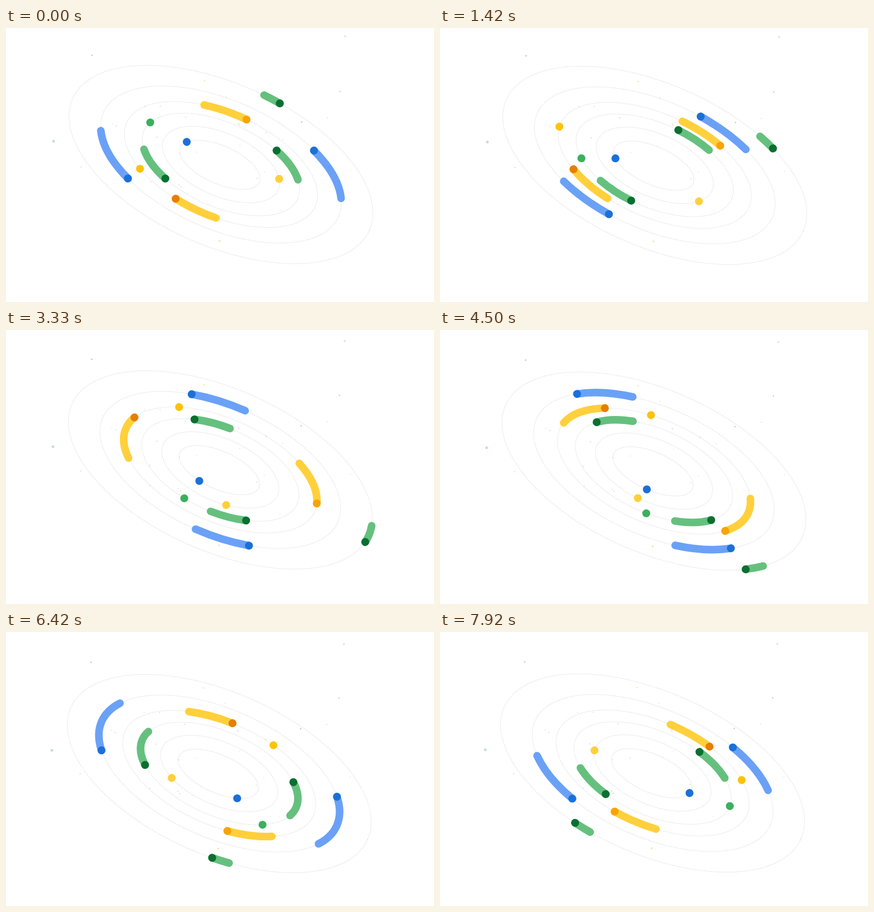
Animation, 800 px wide and 513 px high, one loop 8000 ms. Source, as an HTML page:

```html
<!DOCTYPE html>
<html lang="en">
<head>
<meta charset="utf-8">
<title>Orbits</title>
<style>
  html, body { margin: 0; width: 100%; height: 100%; overflow: hidden; background: #fff; }
  svg { display: block; width: 100vw; height: 100vh; }
  path { fill: none; }
  .orbit { stroke: #bdbdbd; stroke-width: 1; stroke-dasharray: 1 2.2; }
</style>
</head>
<body>
<svg id="stage" viewBox="0 0 800 513"></svg>
<script>
const LOOP = 8000, FPS = 12;      // ms, steps per second
const TURN = 15, DELAY = 0.02;    // seconds per revolution, seconds before the bodies start
const BAND = 0.09;                // band length as a share of its orbit
const BLUE = '#6aa1f7', GREEN = '#65c07e', YELLOW = '#ffd03b';
const DEEP_BLUE = '#1b70d8', DEEP_GREEN = '#0b6f31';

const stage = document.getElementById('stage');
const drifting = [], bodies = [];

function add(parent, tag, attributes) {
  const node = document.createElementNS('http://www.w3.org/2000/svg', tag);
  for (const [name, value] of Object.entries(attributes)) node.setAttribute(name, value);
  return parent.appendChild(node);
}

// Bigger specks are nearer and drift further
function speck(cx, cy, r, fill) {
  drifting.push({ node: add(stage, 'circle', { cx, cy, r, fill }), depth: r * 0.4 });
}

function random(seed) {
  const value = Math.sin(seed * 12.9898) * 43758.5453;
  return value - Math.floor(value);
}

for (let i = 1; i <= 24; i++) {
  const angle = random(i) * 2 * Math.PI, reach = Math.sqrt(random(i + 50));
  speck(400 + 290 * reach * Math.cos(angle), 220 + 150 * reach * Math.sin(angle),
        1 + random(i + 100) * 0.5, '#e4e9e6');
}
speck(89, 212, 2.5, '#bfe0d0');
speck(634, 15.5, 2, '#dfe5e1');
speck(399, 398.5, 1.9, '#f4e8b4');
speck(371, 99, 1.5, '#f5e9b8');
speck(161, 51, 1.5, '#c4d0ce');
speck(552.5, 176, 1.4, '#c4d0ce');
speck(624, 119, 1.3, '#c4d0ce');

const system = add(stage, 'g', {});
drifting.push({ node: system, depth: 1 });

function orbit(a, b = a / 2, x = 401.8, y = 255.6) {
  const group = add(system, 'g', { transform: `translate(${x} ${y}) rotate(24)` });
  const d = `M${a} 0A${a} ${b} 0 0 1 ${-a} 0A${a} ${b} 0 0 1 ${a} 0`;
  add(group, 'path', { d, class: 'orbit' });
  return { group, d };
}

const orbits = [orbit(303.5), orbit(240.4), orbit(192.9), orbit(157.1), orbit(117), orbit(80.6, 35.5, 400, 256.1)];
const directionOf = index => index % 2 ? -1 : 1;   // neighbours turn opposite ways

// A dash on the orbit keeps its length along the curve; start is a share of a turn
function dash(index, start, length, stroke, width) {
  const { group, d } = orbits[index];
  const node = add(group, 'path', {
    d, stroke, pathLength: 1, 'stroke-width': width, 'stroke-linecap': 'round',
    'stroke-dasharray': `${length} ${1 - length}`,
  });
  bodies.push({ node, start, direction: directionOf(index) });
}

function dot(index, start, color) {
  dash(index, start, 0.0001, color, 14.8);
}

function band(index, head, headColor, tailColor, length = BAND) {
  dash(index, directionOf(index) > 0 ? head - length : head, length, tailColor, 14.2);
  dot(index, head, headColor);
}

band(0, 0.788, DEEP_GREEN, GREEN, BAND / 4);
for (const half of [0, 0.5]) {
  band(1, 0.3785 + half, DEEP_BLUE, BLUE);
  band(3, 0.361 + half, DEEP_GREEN, GREEN);
}
band(2, 0.3065, '#e67e05', YELLOW);
band(2, 0.7615, '#f8a406', YELLOW);
dot(2, 0.4, '#fdc30b');
dot(3, 0.5235, '#3bb05d');
dot(4, 0.964, YELLOW);
dot(5, 0.54, DEEP_BLUE);

function draw(t) {
  const dx = -4.5 * (t / 8) ** 1.5;
  const dy = 4.75 * (1 - Math.cos(Math.PI * (0.19 * t - 0.00057 * t ** 3)));
  for (const { node, depth } of drifting)
    node.setAttribute('transform', `translate(${dx * depth} ${dy * depth})`);
  for (const { node, start, direction } of bodies) {
    const position = start + direction * (t - DELAY) / TURN;
    node.setAttribute('stroke-dashoffset', Math.floor(position) - position);
  }
}

function tick() {
  const now = performance.now() % LOOP;
  draw(Math.floor((now + 4) * FPS / 1000) % (LOOP * FPS / 1000) / FPS);
  requestAnimationFrame(tick);
}
tick();
</script>
</body>
</html>
```
